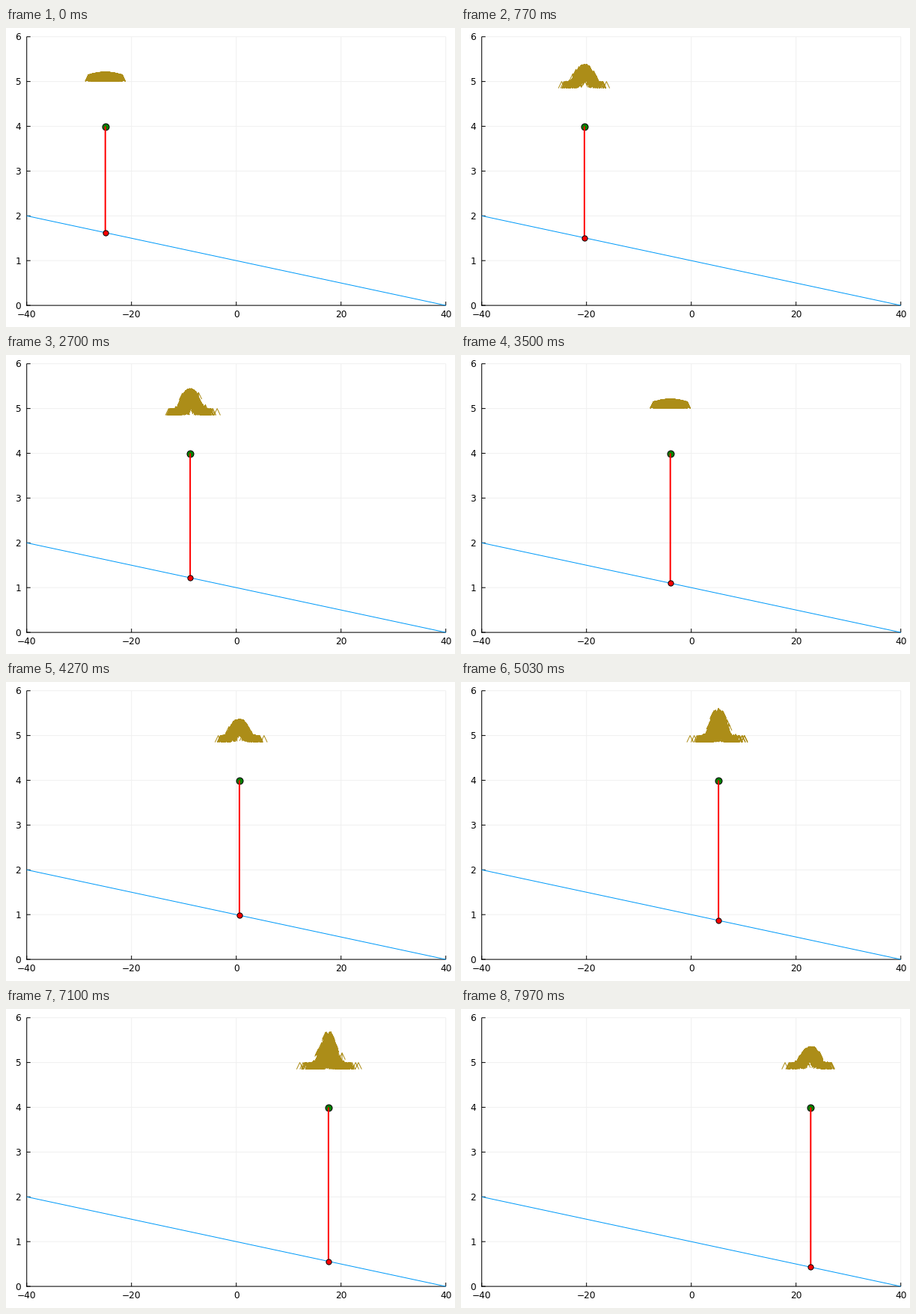
A matplotlib script that plays this animation: 600 px wide and 400 px high, repeating every 8 s.

```python
import numpy as np
import matplotlib
import matplotlib.pyplot as plt
from matplotlib.animation import FuncAnimation

matplotlib.rcParams["path.simplify"] = False
matplotlib.rcParams["font.family"] = "DejaVu Sans"

W, H, DPI = 600, 400, 100
FRAMES, INTERVAL = 400, 20
STEPS = 240                        # three motion steps per five frames
PT = 72 / DPI                      # points per pixel

STARTS = [0, 50, 105, 161, 217]    # steps at which the cloud is resampled
GAINS = [1.1, 1.03, 1.0, 1.0, 1.0]
COUNT = 500
SIGMA, REACH, DRIFT, SENSOR = 1.3, 3.2, 0.17, 4.1
HEAD_X, HEAD_Y = 4.3, 9.0


def px(x):
    return 27.7 + 7 * (np.asarray(x) + 40)


def py(y):
    return 371.1 - 59.9 * np.asarray(y)


def ground(x):
    return 1 - x / 40


def make_cycle(seed, length):
    """Particle offsets and relative weights for each step of one cycle."""
    rng = np.random.default_rng(seed)
    walk = rng.normal(scale=DRIFT, size=(length, COUNT))
    walk[0] = np.clip(rng.normal(scale=SIGMA, size=COUNT), -REACH, REACH)
    offsets = np.cumsum(walk, axis=0)
    logw = -np.cumsum(offsets ** 2, axis=0) / (2 * SENSOR ** 2)
    weights = np.exp(logw - logw.max(axis=1, keepdims=True))
    return offsets, weights


ends = STARTS[1:] + [STEPS]
cycles = [make_cycle(11 + k, b - a) for k, (a, b) in enumerate(zip(STARTS, ends))]


def arrows(step):
    """One broken polyline: a stem and an open head for every particle."""
    k = sum(s <= step for s in STARTS) - 1
    age = step - STARTS[k]
    offsets, weights = cycles[k]
    peak = 12.6 + GAINS[k] * (0.3 * age + 0.0048 * age ** 2)
    x = px(-25 + 0.2 * step + offsets[age])
    base = np.full(COUNT, py(5))
    tip = base - peak * weights[age]
    gap = np.full(COUNT, np.nan)
    xs = np.stack([x, x, gap, x - HEAD_X, x, x + HEAD_X, gap], axis=1)
    ys = np.stack([base, tip, gap, tip + HEAD_Y, tip, tip + HEAD_Y, gap], axis=1)
    return xs.ravel(), ys.ravel()


fig = plt.figure(figsize=(W / DPI, H / DPI), dpi=DPI, facecolor="white")
ax = fig.add_axes([0, 0, 1, 1])
ax.set_xlim(0, W)
ax.set_ylim(H, 0)
ax.axis("off")


def line(xs, ys, color, width=1.0, z=1, **kw):
    return ax.plot(xs, ys, color=color, lw=width * PT, zorder=z, snap=False,
                   solid_capstyle="butt", **kw)[0]


def dot(color, size, z):
    return ax.plot([], [], "o", ms=size * PT, mfc=color, mec="black",
                   mew=1.0 * PT, zorder=z, snap=False)[0]


LEFT, RIGHT = px(-40), px(40)
BOTTOM, TOP = py(0), py(6)

for v in range(-40, 41, 20):
    gx = px(v)
    line([gx, gx], [TOP, BOTTOM], "#f0f0f0", z=0)
    line([gx, gx], [BOTTOM, BOTTOM - 5], "black", z=2)
    ax.text(gx, 387, str(v).replace("-", "\u2212"), fontsize=8.7,
            ha="center", va="baseline")

for v in range(7):
    gy = py(v)
    line([LEFT, RIGHT], [gy, gy], "#f0f0f0", z=0)
    line([LEFT, LEFT + 5], [gy, gy], "black", z=2)
    ax.text(20, gy + 4.5, str(v), fontsize=8.7, ha="right", va="baseline")

line([LEFT, LEFT], [TOP, BOTTOM + 0.5], "black", z=2)
line([LEFT - 0.5, RIGHT], [BOTTOM, BOTTOM], "black", z=2)
line(px([-40, 40]), py([2, 0]), "#009af9", z=3)

craft = dot("#008000", 9.0, 4)
beam = line([], [], "red", 2.0, z=5)
hit = dot("red", 7.2, 6)
cloud = line([], [], "#ac8d18", 1.0, z=7, solid_joinstyle="round")


def update(frame):
    step = (3 * frame + 2) // 5
    x = -25 + 0.2 * step
    cx, y0, y1 = px(x), py(4), py(ground(x))
    craft.set_data([cx], [y0])
    hit.set_data([cx], [y1])
    beam.set_data([cx, cx], [y0, y1])
    cloud.set_data(*arrows(step))
    return craft, beam, hit, cloud


anim = FuncAnimation(fig, update, frames=FRAMES, interval=INTERVAL,
                     init_func=lambda: update(0), repeat=True,
                     repeat_delay=0, blit=False)
plt.show()
```
